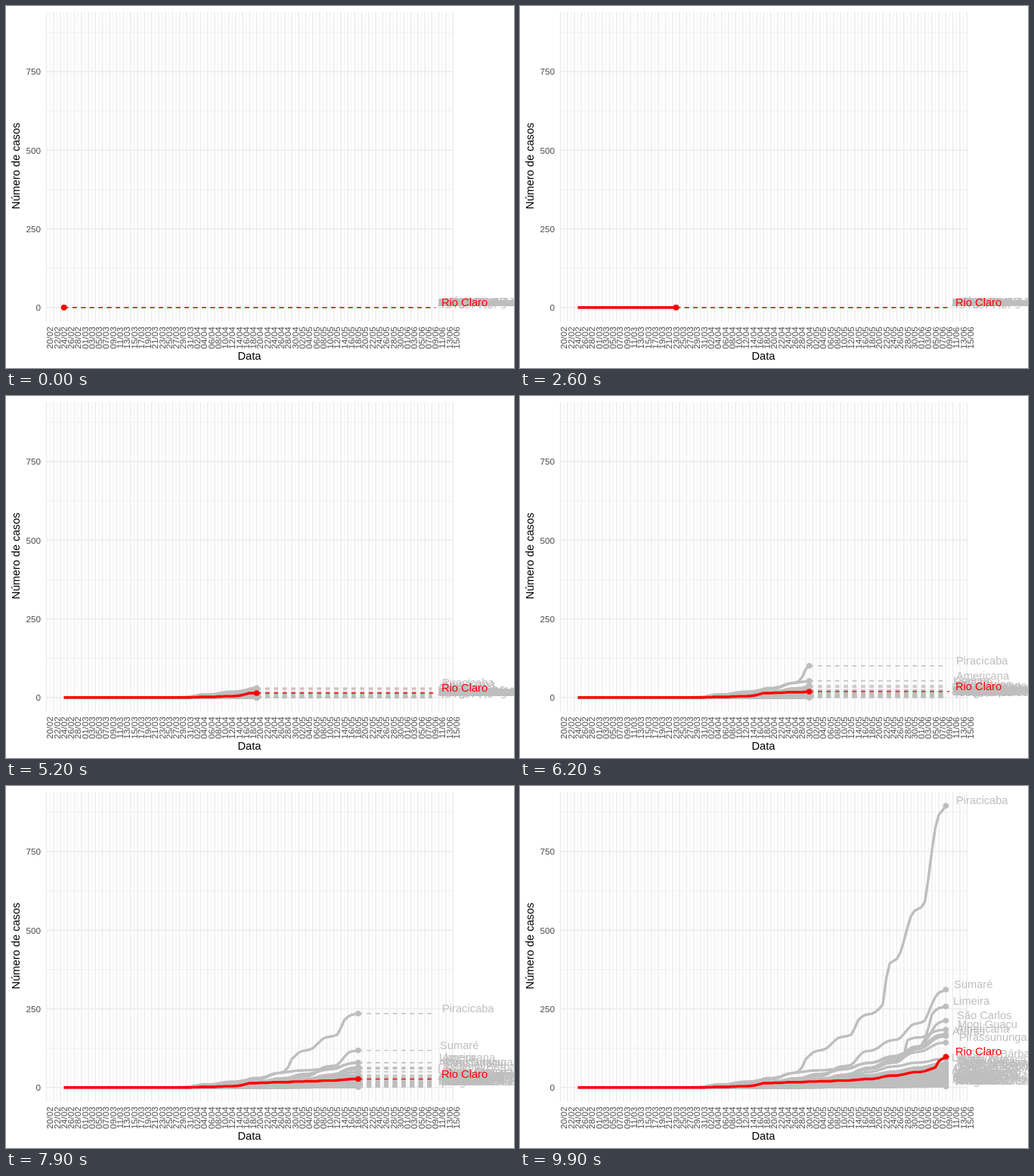
Recreate the animation shown at these times as an HTML page with a canvas. Size 672 by 480 pixels, loop 10 s.

```html
<!DOCTYPE html>
<html lang="pt">
<head>
<meta charset="utf-8">
<style>
html, body { margin: 0; width: 100%; height: 100%; overflow: hidden; background: #fff; }
canvas { display: block; }
</style>
</head>
<body>
<canvas id="stage" width="672" height="480"></canvas>
<script>
const ctx = document.getElementById('stage').getContext('2d');
const FONT = '"Liberation Sans", Arial, sans-serif';
const GRAY = '#bebebe', RED = '#ff0000', TICK = '#4d4d4d';
const FIRST = 5, LAST = 110;
const X = day => 53.5 + day * 4.635;
const Y = cases => 399.8 - cases * 0.417;

// Reporting slows down around the start of every week
const rhythm = day => day - 0.9 * Math.sin((day - 4) * 2 * Math.PI / 7);
const progress = (day, from, to) =>
  (rhythm(day) - rhythm(from)) / (rhythm(to) - rhythm(from));

// Key points alternate day, cases
function curve(...keys) {
  return day => {
    if (day <= keys[0]) return 0;
    let i = 2;
    while (keys[i] < day) i += 2;
    const [d0, v0, d1, v1] = keys.slice(i - 2, i + 2);
    return Math.round(v0 + (v1 - v0) * progress(day, d0, d1));
  };
}

function smallTown(rank) {
  const total = 4 + 74 * (1 - rank) ** 1.8;
  const start = 44 + rank * 185 % 17;
  return day => day <= start ? 0
    : Math.round(total * Math.max(0, progress(day, start, LAST)) ** 1.7);
}

const leaders = {
  "Santa Bárbara d'Oeste": curve(62, 0, 80, 30, 96, 68, 110, 91),
  'Pirassununga': curve(60, 0, 80, 40, 96, 86, 110, 143),
  'Araras': curve(58, 0, 80, 38, 96, 85, 110, 163),
  'Americana': curve(37, 0, 57, 18, 69, 50, 80, 60, 96, 96, 110, 170),
  'Mogi Guaçu': curve(56, 0, 80, 34, 98, 100, 99, 150, 110, 184),
  'São Carlos': curve(50, 0, 80, 36, 96, 80, 102, 130, 110, 213),
  'Limeira': curve(52, 0, 80, 57, 93, 96, 102, 127, 106, 232, 110, 258),
  'Sumaré': curve(45, 0, 74, 36, 79, 64, 83, 72, 87, 115, 96, 152, 104, 213, 110, 311),
  'Piracicaba': curve(37, 0, 57, 24, 67, 47, 70, 90, 79, 156, 83, 168, 85, 214,
    92, 264, 94, 395, 100, 544, 104, 590, 110, 896)
};
const towns = ['Leme', 'Monte Mor', 'Nova Odessa', 'Cosmópolis',
  'Porto Ferreira', 'Artur Nogueira', 'Mogi Mirim', 'Santa Gertrudes', 'Rio das Pedras',
  'Conchal', 'Cordeirópolis', 'Capivari', 'Aguaí', 'Iracemápolis', 'Descalvado',
  'Engenheiro Coelho', 'São Pedro', 'Itirapina', 'Charqueada', 'Santa Cruz das Palmeiras',
  'Estiva Gerbi', 'Elias Fausto', 'Brotas', 'Tambaú', 'Rafard', 'Santa Maria da Serra',
  'Saltinho', 'Ribeirão Bonito', 'Holambra', 'Ipeúna', 'Torrinha', 'Dourado',
  'Santa Cruz da Conceição', 'Corumbataí', 'Mombuca', 'Analândia', 'Águas de São Pedro'];

const grayCities = [
  ...towns.map((name, i) => ({ name, cases: smallTown(i / (towns.length - 1)) })),
  ...Object.entries(leaders).map(([name, cases]) => ({ name, cases }))
];
const redCity = [{
  name: 'Rio Claro',
  cases: curve(40, 0, 53, 4, 58, 14, 80, 22, 88, 27, 95, 38, 102, 49, 107, 64, 110, 98)
}];

function line(x1, y1, x2, y2, width) {
  ctx.lineWidth = width;
  ctx.beginPath();
  ctx.moveTo(x1, y1);
  ctx.lineTo(x2, y2);
  ctx.stroke();
}

function text(str, x, y, size, color, align = 'center', upright = false) {
  ctx.save();
  ctx.font = `${size}px ${FONT}`;
  ctx.fillStyle = color;
  ctx.textAlign = align;
  ctx.translate(Math.round(x), Math.round(y));
  if (upright) ctx.rotate(-Math.PI / 2);
  ctx.fillText(str, 0, 0);
  ctx.restore();
}

function drawAxes() {
  ctx.strokeStyle = '#ebebeb';
  for (let v = 0; v <= 875; v += 125) {
    const major = v % 250 === 0;
    line(53, Y(v), 592, Y(v), major ? 1.42 : 0.71);
    if (major) text(v, 46, Y(v) + 4.2, 11.73, TICK, 'right');
  }
  for (let d = 0; d <= 116; d++) {
    line(X(d), 8, X(d), 418.5, d % 2 ? 0.71 : 1.42);
    if (d % 2) continue;
    const date = new Date(Date.UTC(2020, 1, 20 + d)).toISOString();
    text(date.slice(8, 10) + '/' + date.slice(5, 7), X(d) + 8.8, 440, 11.73, TICK, 'center', true);
  }
  text('Data', 322, 469, 14.67, '#000');
  text('Número de casos', 18, 212, 14.67, '#000', 'center', true);
}

function drawCities(cities, color, day, end) {
  ctx.strokeStyle = ctx.fillStyle = color;
  ctx.lineJoin = 'round';
  const x = X(day);
  ctx.setLineDash([5.7, 5.7]);
  for (const { cases } of cities) line(x, Y(cases(day)), X(end), Y(cases(day)), 1.42);
  ctx.setLineDash([]);
  ctx.lineWidth = 3.4;
  for (const { cases } of cities) {
    ctx.beginPath();
    for (let d = FIRST; d <= day; d++) ctx.lineTo(X(d), Y(cases(d)));
    ctx.stroke();
  }
  for (const { cases } of cities) {
    ctx.beginPath();
    ctx.arc(x, Y(cases(day)), 3.75, 0, 7);
    ctx.fill();
  }
}

function drawLabels(cities, color, day) {
  ctx.font = `14.67px ${FONT}`;
  for (const { name, cases } of cities) {
    const x = X(LAST) + 0.2 * ctx.measureText(name).width;
    text(name, x, Y(cases(day)) - 2, 14.67, color, 'left');
  }
}

function draw() {
  const step = Math.floor(performance.now() % 10000 / 100);
  const day = Math.round(FIRST + step * (LAST - FIRST) / 99);
  ctx.fillStyle = '#fff';
  ctx.fillRect(0, 0, 672, 480);
  drawAxes();
  drawCities(grayCities, GRAY, day, LAST);
  drawCities(redCity, RED, day, LAST + 1);
  drawLabels(grayCities, GRAY, day);
  drawLabels(redCity, RED, day);
  requestAnimationFrame(draw);
}
draw();
</script>
</body>
</html>
```
